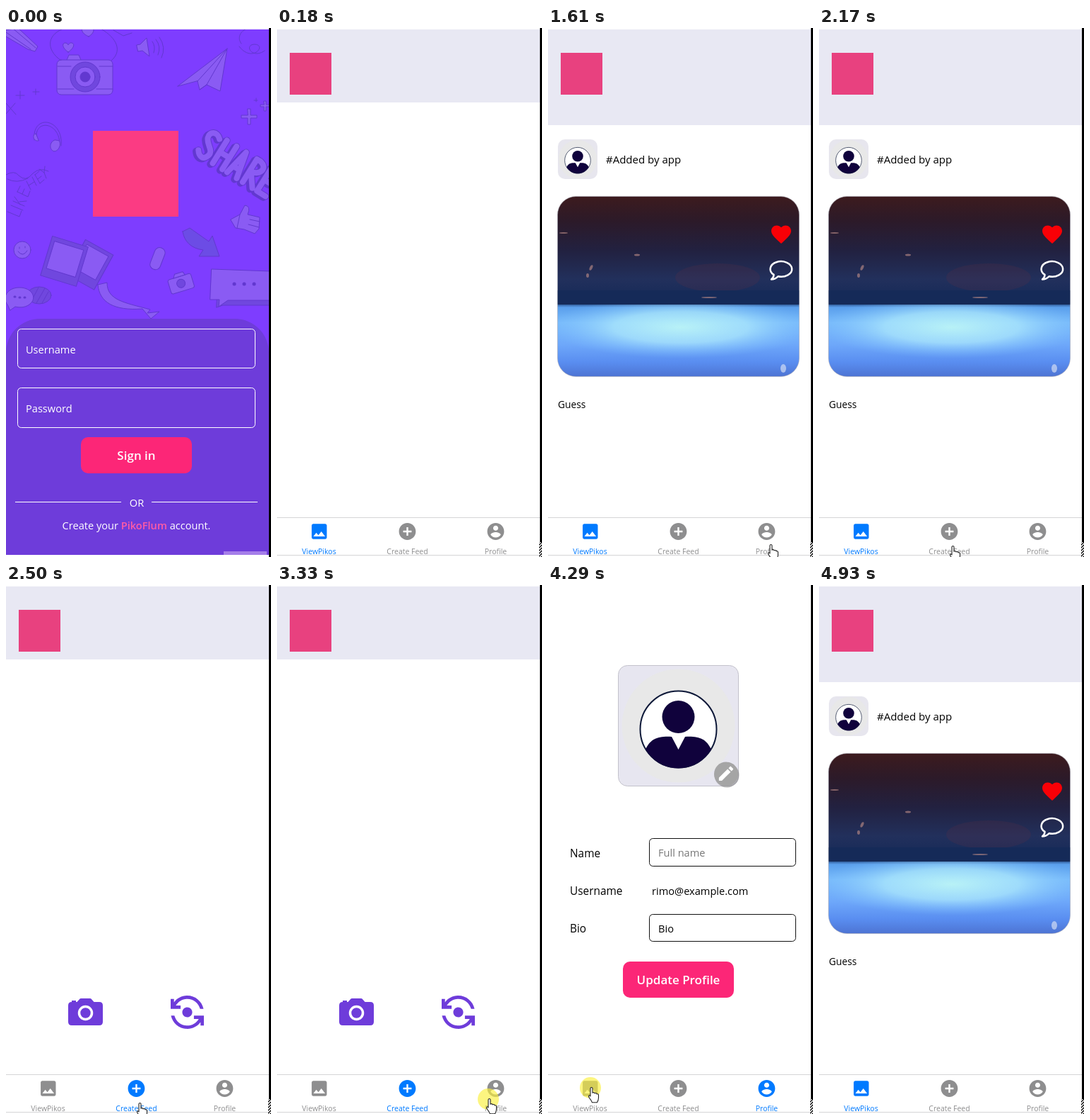
Animation of 375x746 px, one loop 6.07 s. Source, as an HTML page:

```html
<!DOCTYPE html>
<html lang="en">
<head>
<meta charset="utf-8">
<title>Photo sharing app</title>
<style>
  html, body { margin: 0; width: 100%; height: 100%; overflow: hidden; background: #fff; }
  svg { display: block; }
  text { font-family: "Open Sans", "Noto Sans", sans-serif; font-size: 15px; }
  .mid { text-anchor: middle; }
  .bold { font-weight: 600; font-size: 17px; fill: #fff; }
  .small text { font-size: 14.6px; }
  .label text { font-size: 15.4px; }
  .tab { fill: #8e8e8f; }
  .tab.on { fill: #007aff; }
  .tab text { font-size: 10.5px; }
  .field { fill: none; stroke-width: 1; }
  .doodles { fill: #8a5bf3; stroke: #6238d0; stroke-width: 1; stroke-linejoin: round; stroke-linecap: round; }
  .doodles .line { fill: none; }
  .doodles .dark { fill: #7047de; }
</style>
</head>
<body>
<svg width="375" height="746" viewBox="0 0 375 746">
  <defs>
    <symbol id="avatar" viewBox="0 0 171 171">
      <circle cx="85.5" cy="85.5" r="80" fill="#e8e8e8"/>
      <circle cx="85.5" cy="90.5" r="54" fill="#fff" stroke="#0d1838" stroke-width="2"/>
      <circle cx="85.5" cy="73" r="23" fill="#10023c"/>
      <path d="M39 119C46 104 56 100 76 101L85.5 119 95 101C115 100 125 104 132 119A54 54 0 0 1 39 119Z" fill="#10023c"/>
    </symbol>
    <path id="share" d="M18 6C10-2 0 4 3 13S20 24 17 34 6 42 1 35M28 2V40M44 2V40M28 21H44M52 40L60 2 68 40M55 28H65M78 40V2H84C98 4 94 20 80 21L94 40M116 2H102V40H116M102 21H113"/>
    <linearGradient id="photo" x2="0" y2="1">
      <stop offset="0" stop-color="#3d1b1e"/>
      <stop offset=".14" stop-color="#2c1a29"/>
      <stop offset=".3" stop-color="#222140"/>
      <stop offset=".46" stop-color="#22305c"/>
      <stop offset=".56" stop-color="#162a58"/>
      <stop offset=".59" stop-color="#183468"/>
      <stop offset=".615" stop-color="#5a9fec"/>
      <stop offset=".7" stop-color="#78bafb"/>
      <stop offset=".82" stop-color="#6ea8fa"/>
      <stop offset=".92" stop-color="#598df0"/>
      <stop offset="1" stop-color="#4d73d2"/>
    </linearGradient>
    <radialGradient id="glow">
      <stop offset="0" stop-color="#bff8f6" stop-opacity=".9"/>
      <stop offset=".5" stop-color="#b0ecfc" stop-opacity=".7"/>
      <stop offset="1" stop-color="#80c4ff" stop-opacity="0"/>
    </radialGradient>
    <pattern id="hatch" width="4" height="4" patternUnits="userSpaceOnUse">
      <rect width="4" height="4" fill="#fff"/>
      <path d="M-1 1L1-1M0 4L4 0M3 5L5 3" stroke="#000" stroke-width="1.3"/>
    </pattern>
    <clipPath id="screen"><rect y="2" width="372" height="741"/></clipPath>
    <clipPath id="frame"><rect x="13.5" y="237.5" width="342" height="254" rx="26"/></clipPath>
  </defs>
  <rect width="375" height="746" fill="#fff"/>

  <g id="login" clip-path="url(#screen)">
    <rect width="372" height="746" fill="#7e3dff"/>
    <g class="doodles">
      <path class="line" d="M78 46C55 30 58 8 84 0M149 46C168 30 152 10 132 0"/>
      <path d="M86 45l3-7h14l3 7z"/>
      <rect x="72" y="45" width="79" height="49" rx="6"/>
      <path class="line" d="M73 54H92M132 54H151M73 86H96M128 86H151"/>
      <circle class="dark" cx="112" cy="69" r="21"/>
      <circle cx="112" cy="69" r="14"/>
      <circle cx="112" cy="69" r="7" fill="#6238d0"/>
      <path d="M88 34c-9-6-9-13-4-13 3 0 4 3 4 3s2-4 5-3c5 1 3 8-5 13zM117 12c-10-4-12-11-7-13 4-1 6 3 6 3s2-5 6-3c4 3 2 9-5 13z"/>
      <path d="M185 24l5-1 9-9 4 26-10-8-6 1z"/>
      <path class="line" d="M207 19q5 7 2 16M212 16q8 10 3 22M217 13q10 14 3 29"/>
      <path d="M243 82L313 29 303 89 284 80 274 87 271 75Z"/>
      <path class="line" d="M313 29L271 75M313 29L284 80M274 87L284 80M330 26c18 24 40-2 22-3-16 0-4 22 14 9M333 22c-8-10 2-22 13-22"/>
      <path d="M0 3L17 0 45 26 41 33 31 30 0 12Z"/>
      <path class="line" d="M0 6L35 30M9 0L42 28M152 3l14 8 12-4"/>
      <path class="line" d="M0 106l14 16M13 106L0 121M20 89v11M14 95h12M42 86v8M38 90h9M354 99v5M351 102h5"/>
      <path d="M342 114h4v9h9v4h-9v9h-4v-9h-9v-4h9zM365 103h3v5h7v3h-7v6h-3v-6h-5v-3h5z"/>
      <path class="line" d="M43 157c-4-30 34-25 33 8M40 158c-4-38 42-31 38 8"/>
      <path d="M42 149c-6 1-3 12 4 10zM69 158c-7 2-9 13-1 16 7 0 11-11 7-15z"/>
      <g transform="translate(290 142) rotate(32)" fill="none">
        <use href="#share" x="-2" y="3" stroke-width="10"/>
        <use href="#share" stroke-width="10"/>
        <use href="#share" stroke="#8a5bf3" stroke-width="8"/>
      </g>
      <path class="line" d="M35 228l-6-12M43 222l-6-12M32 222l8-5M48 219l-7-12M48 219l6-5M45 213l5-4M41 207l6-5M57 212l-3-8-7-5M54 204l1-9"/>
      <path class="line" d="M2 259l17 7 3-8M7 250l17 7M10 244l16 7M12 238l8 11M29 244l-10 1M16 231l15 7 3-8M23 234l3-7M16 231l4-8"/>
      <path class="line" d="M0 207q12-7 18 1 10 10 20-3 10-9 22-3M2 213q13 7 29-1"/>
      <path d="M318 270l13-7 7-13q9 1 4 13l17 4-1 16-6 7-15-6-12-2z"/>
      <path class="line" d="M331 263l-4 19M345 270l14 3M343 277l15 4"/>
      <path d="M250 287l10-5 27 19 5-8 10 29-29 0 6-9c-17-2-27-12-29-26z" fill="#6c4ce5"/>
      <g transform="rotate(29 119 334)"><rect class="dark" x="96" y="306" width="45" height="56"/><rect x="101" y="311" width="35" height="38"/></g>
      <g transform="rotate(17 83 329)"><rect class="dark" x="56" y="300" width="53" height="58"/><rect x="61" y="306" width="43" height="40"/></g>
      <circle cx="23" cy="313" r="12"/>
      <path class="line" d="M17 315q7 9 13-1M19 309v2M27 308v2"/>
      <ellipse class="dark" cx="47" cy="377" rx="17" ry="12"/>
      <path class="line" d="M36 385l10-19M43 388l12-21M51 388l9-16"/>
      <path d="M2 390c-8-9-1-24 17-24s26 15 14 24c-7 5-15 4-20 3l-7 5z"/>
      <path class="line" d="M12 379h1M19 380h1M26 380h1" stroke-width="3"/>
      <rect x="207" y="309" width="15" height="32" rx="7" transform="rotate(21 214 325)"/>
      <g transform="rotate(-17 248 358)"><rect x="230" y="350" width="34" height="21" rx="3"/><path d="M239 350l3-5h12l2 5z"/><circle class="dark" cx="247" cy="360" r="6"/></g>
      <path d="M130 362l13-3c0 25 24 28 61 38l-4 5 17-2-12 10-12-14c-40 3-61-9-63-34z"/>
      <path class="dark" d="M299 376l74 5v10h-66l-9 3z"/>
      <path d="M291 340l83 3v41h-60l-13 9 1-10-13 0z"/>
      <path class="line" d="M323 361h.1M337 361h.1M351 361h.1" stroke-width="5"/>
    </g>
    <rect x="123" y="145" width="121" height="121" fill="#fb3b83"/>
    <rect y="410" width="372" height="400" rx="48" fill="#6e3cda"/>
    <g stroke="#fff">
      <rect class="field" x="16.5" y="424.5" width="336" height="55" rx="5"/>
      <rect class="field" x="16.5" y="507.5" width="336" height="56" rx="5"/>
      <path d="M13 668.5H163M206 668.5H356"/>
    </g>
    <rect x="106" y="577" width="157" height="51" rx="10" fill="#fc2677"/>
    <g class="small" fill="#fff">
      <text x="28" y="459">Username</text>
      <text x="28" y="542">Password</text>
      <text class="mid" x="185" y="675">OR</text>
      <text class="mid" x="184.5" y="707">Create your <tspan fill="#ff5ba6" font-weight="600">PikoFlum</tspan> account.</text>
    </g>
    <text class="mid bold" x="184.5" y="609">Sign in</text>
    <rect x="308" y="738" width="61" height="5" fill="#a57ee9"/>
  </g>

  <g id="head">
    <rect id="band" y="2" width="372" height="103" fill="#e8e8f3"/>
    <rect x="18" y="35" width="59" height="59" fill="#e8417f"/>
  </g>

  <g id="feed">
    <rect x="14" y="157" width="56" height="56" rx="10" fill="#e7e6ee"/>
    <use href="#avatar" x="13" y="156" width="58" height="58"/>
    <text x="82" y="191">#Added by app</text>
    <g clip-path="url(#frame)">
      <rect x="13" y="237" width="343" height="255" fill="url(#photo)"/>
      <ellipse cx="240" cy="352" rx="60" ry="20" fill="#633043" opacity=".2"/>
      <ellipse cx="188" cy="422" rx="190" ry="44" fill="url(#glow)"/>
      <rect x="13" y="370" width="343" height="20" fill="#152a58"/>
      <g fill="#b98a86" opacity=".65">
        <ellipse cx="22" cy="289" rx="6" ry="1"/>
        <ellipse cx="61" cy="338" rx="2" ry="4" transform="rotate(25 61 338)"/>
        <ellipse cx="56" cy="349" rx="2" ry="3"/>
        <ellipse cx="126" cy="320" rx="4" ry="1.5"/>
        <ellipse cx="228" cy="380" rx="11" ry="1"/>
        <ellipse cx="333" cy="480" rx="4" ry="6" fill="#dce4f5"/>
      </g>
    </g>
    <rect x="13.5" y="237.5" width="342" height="254" rx="26" fill="none" stroke="#a9a9b4" stroke-opacity=".6"/>
    <path transform="translate(313.2 274.2) scale(1.4)" fill="#f90006" d="M12 21.35l-1.45-1.32C5.4 15.36 2 12.28 2 8.5 2 5.42 4.42 3 7.5 3c1.74 0 3.41.81 4.5 2.09C13.09 3.81 14.76 3 16.5 3 19.58 3 22 5.42 22 8.5c0 3.78-3.4 6.86-8.55 11.54z"/>
    <path d="M319.5 347.9A15.3 10.8 0 1 1 325.5 350.3Q321 354.5 316 354.5 319.5 352 319.5 347.9Z" fill="none" stroke="#fff" stroke-width="2.5" stroke-linejoin="round"/>
    <text x="14" y="536" style="font-size:13.8px">Guess</text>
  </g>

  <g id="create" fill="#6e3cda">
    <path d="M93 588v-2h6v2h1.5l4-4.5q.6-.5 1.500-.5h13q1 0 1.500.5l4 4.500h7.500q5 0 5 5v23q0 5-5 5h-39q-5 0-5-5v-23q0-5 5-5z"/>
    <circle cx="112.5" cy="603.5" r="9" fill="none" stroke="#fff" stroke-width="3.5"/>
    <path transform="translate(228.3 574.3) scale(2.35)" d="M9 12c0 1.66 1.34 3 3 3s3-1.34 3-3-1.34-3-3-3-3 1.34-3 3zm-1-2V8H5.09C6.47 5.61 9.05 4 12 4c3.72 0 6.85 2.56 7.74 6h2.06c-.93-4.56-4.96-8-9.8-8-3.27 0-6.18 1.58-8 4.01V4H2v6h6zm8 4v2h2.91c-1.38 2.39-3.96 4-6.91 4-3.72 0-6.85-2.56-7.74-6H2.2c.93 4.56 4.96 8 9.8 8 3.27 0 6.18-1.58 8-4.01V20h2v-6h-6z"/>
  </g>

  <g id="profile">
    <rect x="99.5" y="113.5" width="170" height="170" rx="13" fill="#e7e6f0" stroke="#c3c2cb"/>
    <use href="#avatar" x="99" y="113" width="171" height="171"/>
    <circle cx="253" cy="268" r="17.5" fill="#777" opacity=".5"/>
    <circle cx="252" cy="266.5" r="17" fill="#a5a5a5"/>
    <path transform="translate(238.5 252.5) scale(1.12)" fill="#fff" d="M3 17.25V21h3.75L17.81 9.94l-3.75-3.75zM20.71 7.04c.39-.39.39-1.02 0-1.41l-2.34-2.34c-.39-.39-1.02-.39-1.41 0l-1.83 1.83 3.75 3.75z"/>
    <g class="label">
      <text x="31" y="384">Name</text>
      <text x="31" y="437">Username</text>
      <text x="31" y="490">Bio</text>
    </g>
    <g stroke="#111">
      <rect class="field" x="143.5" y="357.5" width="207" height="39" rx="5"/>
      <rect class="field" x="143.5" y="464.5" width="207" height="38" rx="5"/>
    </g>
    <g class="small">
      <text x="156" y="383" fill="#777">Full name</text>
      <text x="147" y="437">rimo@example.com</text>
      <text x="156" y="490">Bio</text>
    </g>
    <rect x="106" y="531" width="157" height="51" rx="10" fill="#fc2677"/>
    <text class="mid bold" x="184.5" y="563">Update Profile</text>
  </g>

  <g id="tabs">
    <path d="M0 690.5H372M0 743.5H372" stroke="#d4d4d6"/>
    <g class="tab">
      <path transform="translate(45.5 695.7) scale(1.19)" d="M21 19V5c0-1.1-.9-2-2-2H5c-1.1 0-2 .9-2 2v14c0 1.1.9 2 2 2h14c1.1 0 2-.9 2-2zM8.5 13.5l2.5 3.01L14.5 12l4.5 6H5z"/>
      <text class="mid" x="59.5" y="742">ViewPikos</text>
    </g>
    <g class="tab">
      <path transform="translate(170.2 695.7) scale(1.19)" d="M12 2C6.48 2 2 6.48 2 12s4.48 10 10 10 10-4.48 10-10S17.52 2 12 2zm5 11h-4v4h-2v-4H7v-2h4V7h2v4h4z"/>
      <text class="mid" x="184.5" y="742">Create Feed</text>
    </g>
    <g class="tab">
      <path transform="translate(295.2 695.7) scale(1.19)" d="M12 2C6.48 2 2 6.48 2 12s4.48 10 10 10 10-4.48 10-10S17.52 2 12 2zm0 3c1.66 0 3 1.34 3 3s-1.34 3-3 3-3-1.34-3-3 1.34-3 3-3zm0 14.2c-2.5 0-4.71-1.28-6-3.22.03-1.99 4-3.08 6-3.08 1.99 0 5.97 1.09 6 3.08-1.29 1.94-3.5 3.22-6 3.22z"/>
      <text class="mid" x="309.5" y="742">Profile</text>
    </g>
  </g>

  <rect x="372" width="3" height="746"/>
  <rect id="edge" x="371" y="725" width="4" height="21" fill="url(#hatch)"/>
  <g id="cursor">
    <circle id="press" cx="4" cy="1" r="15" fill="#fbf03c" opacity=".65"/>
    <path d="M4 2a1.5 1.5 0 0 1 3 0v6q3-1 3 .8 3-.8 3 1 2.5-.5 2.5 1.5v4q0 3-2 6.5H6.5q-1-3-4-6.5-2-3 0-3.5 1 0 1.5 1.5z" fill="#fff" stroke="#222" stroke-width="1.1"/>
  </g>
</svg>
<script>
const LOOP = 6070;
const $ = id => document.getElementById(id);
const tabs = document.querySelectorAll('.tab');

// start time, visible groups, header height, active tab
const scenes = [
  [0, 'login', 0, -1],
  [60, 'head tabs edge', 103, 0],
  [640, 'head feed tabs edge', 135, 0],
  [2380, 'head create tabs edge', 103, 1],
  [3460, 'profile tabs edge', 0, 2],
  [4410, 'head feed tabs edge', 135, 0]
];
// time, x, y
const path = [
  [640, 366, 724], [1090, 366, 724], [1400, 310, 728], [1610, 310, 728],
  [2170, 184, 730], [2750, 184, 730], [3270, 295, 724], [3720, 295, 724],
  [4040, 56, 708], [4670, 56, 708], [4930, 66, 750]
];
const presses = [[2380, 2500], [3330, 3510], [4290, 4410]];
const groups = ['login', 'head', 'feed', 'create', 'profile', 'tabs', 'edge'];

const show = (el, on) => { el.style.display = on ? '' : 'none'; };
const ease = u => u * u * (3 - 2 * u);

function cursorAt(t) {
  const i = path.findIndex(p => p[0] > t);
  if (i < 1) return null;
  const [t0, x0, y0] = path[i - 1], [t1, x1, y1] = path[i];
  const u = ease((t - t0) / (t1 - t0));
  return [x0 + (x1 - x0) * u, y0 + (y1 - y0) * u];
}

function draw(t) {
  const [, names, height, active] = scenes.filter(s => s[0] <= t).pop();
  const visible = names.split(' ');
  groups.forEach(g => show($(g), visible.includes(g)));
  $('band').setAttribute('height', height);
  tabs.forEach((tab, i) => tab.classList.toggle('on', i === active));
  const pos = cursorAt(t);
  show($('cursor'), pos);
  if (pos) $('cursor').setAttribute('transform', `translate(${pos})`);
  show($('press'), presses.some(([a, b]) => t >= a && t < b));
}

const start = performance.now();
function tick() {
  draw((performance.now() - start) % LOOP);
  requestAnimationFrame(tick);
}
tick();
</script>
</body>
</html>
```
